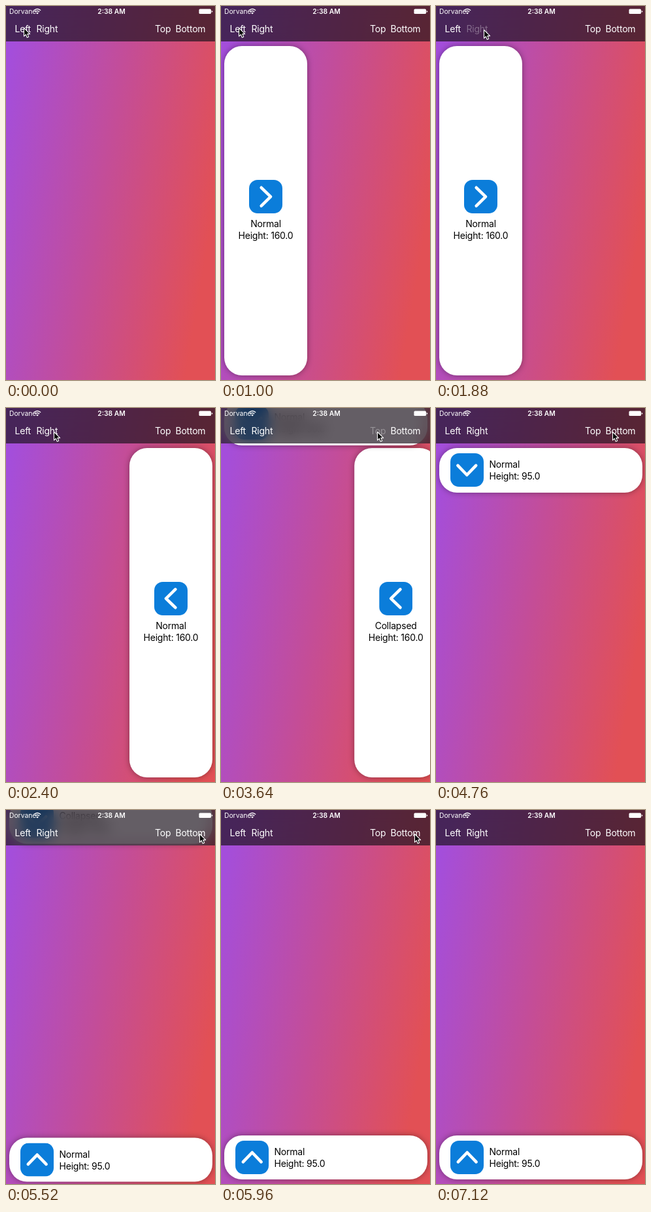
Animation of 320 by 570 pixels, one loop 7160 ms. Source, as an HTML page:

```html
<!DOCTYPE html>
<html lang="en">
<head>
<meta charset="utf-8">
<title>Edge panels</title>
<style>
html, body { margin: 0; width: 100%; height: 100%; overflow: hidden; }
#stage {
  position: relative; width: 320px; height: 570px; overflow: hidden;
  font: 14px/18px Inter, Roboto, sans-serif; letter-spacing: -.22px; color: #000;
  background: linear-gradient(99.65deg, #a44edb 18px, #c44d97 195px, #e25055 366px);
}
#stage * { position: absolute; white-space: nowrap; }
.card {
  background: #fff; border-radius: 27px; display: none;
  box-shadow: 0 0 10px rgba(0, 0, 0, .38);
}
.icon { width: 51px; height: 51px; }
.side .icon { left: 38px; top: 204px; }
.side .info { left: 0; width: 100%; top: 262px; text-align: center; }
.flat .icon { left: 17px; top: 8px; }
.flat .info { left: 76.5px; top: 16px; }
#stage .info div { position: static; }
#bar {
  left: 0; top: 0; width: 320px; height: 54px; color: #fff;
  background: rgba(27, 18, 28, .68);
  -webkit-backdrop-filter: blur(10px); backdrop-filter: blur(10px);
}
.btn { top: 26px; }
.status { top: -1px; font-size: 10.3px; letter-spacing: 0; }
#clock { left: 0; width: 323px; text-align: center; font-weight: 600; }
#cursor { left: 0; top: 0; overflow: visible; }
</style>
</head>
<body>
<div id="stage">
  <div id="bar">
    <span class="status" style="left:5px">Dorvane</span>
    <svg style="left:42px;top:3px" width="12" height="10" fill="none" stroke="#fff" stroke-width="1.4">
      <path d="M.9 3.8Q6 -.9 11.1 3.8M2.8 5.9Q6 3 9.2 5.9"/>
      <path d="M6 9.4L4.1 7.5Q6 6 7.9 7.5Z" fill="#fff" stroke="none"/>
    </svg>
    <span class="status" id="clock">2:38 AM</span>
    <svg style="left:295px;top:4px" width="22" height="9" fill="#fff">
      <rect x=".5" y=".5" width="18.5" height="7.5" rx="1.6"/>
      <path d="M19.7 2.7Q21.2 3.2 21.2 4.3T19.7 5.9Z"/>
    </svg>
    <span class="btn" style="left:13.5px">Left</span>
    <span class="btn" style="left:46.5px">Right</span>
    <span class="btn" style="left:228px">Top</span>
    <span class="btn" style="left:259.5px">Bottom</span>
  </div>
  <svg id="cursor" width="12" height="18">
    <path d="M.5 .5V13.2L3.4 10.5L5.3 15L7.7 14L5.8 9.6H9.7Z" fill="#000" stroke="#fff" stroke-width="1.1" stroke-linejoin="round"/>
  </svg>
</div>
<script>
const LOOP = 7160, SLIDE = 400, CLOCK_TICK = 6480;
const stage = document.getElementById('stage');
const bar = document.getElementById('bar');
const clock = document.getElementById('clock');
const cursor = document.getElementById('cursor');
const buttons = [...document.querySelectorAll('.btn')];

// box: x, y, width, height; away: offset when hidden; turn: chevron angle
const panels = [
  { kind: 'side', box: [5, 61, 127, 502], away: [-136.5, 0], turn: 0, size: '160.0', tap: 400 },
  { kind: 'side', box: [189, 61, 127, 502], away: [136.5, 0], turn: 180, size: '160.0', tap: 1900 },
  { kind: 'flat', box: [5, 61, 311, 67.5], away: [0, -81], turn: 90, size: '95.0', tap: 3548 },
  { kind: 'flat', box: [5, 495.5, 311, 67.5], away: [0, 81], turn: -90, size: '95.0', tap: 5180 }
];

// time, x, y of the pointer tip
const route = [
  [0, 27, 33], [1150, 27, 33], [1680, 73, 36], [2500, 73, 36],
  [3250, 239, 36], [4250, 239, 36], [4700, 270, 36], [4780, 270, 36],
  [5040, 296, 36], [6300, 296, 36], [6800, 334, -20], [LOOP, 334, -20]
];

const clamp = v => Math.max(0, Math.min(1, v));
const smooth = v => v * v * (3 - 2 * v);

// ease-in-out, cubic-bezier(.42, 0, .58, 1)
function ease(x) {
  let lo = 0, hi = 1, s = .5;
  for (let i = 0; i < 20; i++) {
    s = (lo + hi) / 2;
    const bx = 1.26 * (1 - s) ** 2 * s + 1.74 * (1 - s) * s * s + s ** 3;
    if (bx < x) lo = s; else hi = s;
  }
  return smooth(s);
}

function build(p) {
  const el = document.createElement('div');
  const [x, y, w, h] = p.box;
  el.className = 'card ' + p.kind;
  el.style.cssText = `left:${x}px;top:${y}px;width:${w}px;height:${h}px`;
  el.innerHTML = `
    <svg class="icon" viewBox="0 0 51 51">
      <rect width="51" height="51" rx="13" fill="#0b7dda"/>
      <path d="M18.7 11.8L33 25.7L18.7 39.6" transform="rotate(${p.turn} 25.5 25.5)"
        fill="none" stroke="#fff" stroke-width="4.6" stroke-linecap="round" stroke-linejoin="round"/>
    </svg>
    <div class="info"><div class="state">Normal</div><div>Height: ${p.size}</div></div>`;
  stage.insertBefore(el, bar);
  p.el = el;
  p.label = el.querySelector('.state');
}

function drawPanel(p, i, t) {
  const leave = i < panels.length - 1 ? panels[i + 1].tap : Infinity;
  const leaving = t >= leave;
  const shown = t >= p.tap && t < leave + SLIDE;
  p.el.style.display = shown ? 'block' : 'none';
  if (shown) {
    const k = leaving ? ease(clamp((t - leave) / SLIDE)) : 1 - ease(clamp((t - p.tap) / SLIDE));
    p.el.style.transform = `translate(${p.away[0] * k}px, ${p.away[1] * k}px)`;
    p.label.textContent = leaving ? 'Collapsed' : 'Normal';
  }
  const since = t - p.tap;
  const dim = since < -90 ? 0 : 1 - clamp((since - 110) / 220);
  buttons[i].style.opacity = 1 - .68 * dim;
}

function drawCursor(t) {
  let i = 1;
  while (i < route.length - 1 && route[i][0] < t) i++;
  const [t0, x0, y0] = route[i - 1], [t1, x1, y1] = route[i];
  const k = smooth(clamp((t - t0) / (t1 - t0)));
  cursor.style.transform = `translate(${x0 + (x1 - x0) * k}px, ${y0 + (y1 - y0) * k}px)`;
}

function frame(now) {
  const t = Math.max(0, now - start) % LOOP;
  panels.forEach((p, i) => drawPanel(p, i, t));
  drawCursor(t);
  clock.textContent = t < CLOCK_TICK ? '2:38 AM' : '2:39 AM';
  requestAnimationFrame(frame);
}

panels.forEach(build);
const start = performance.now();
frame(start);
</script>
</body>
</html>
```
